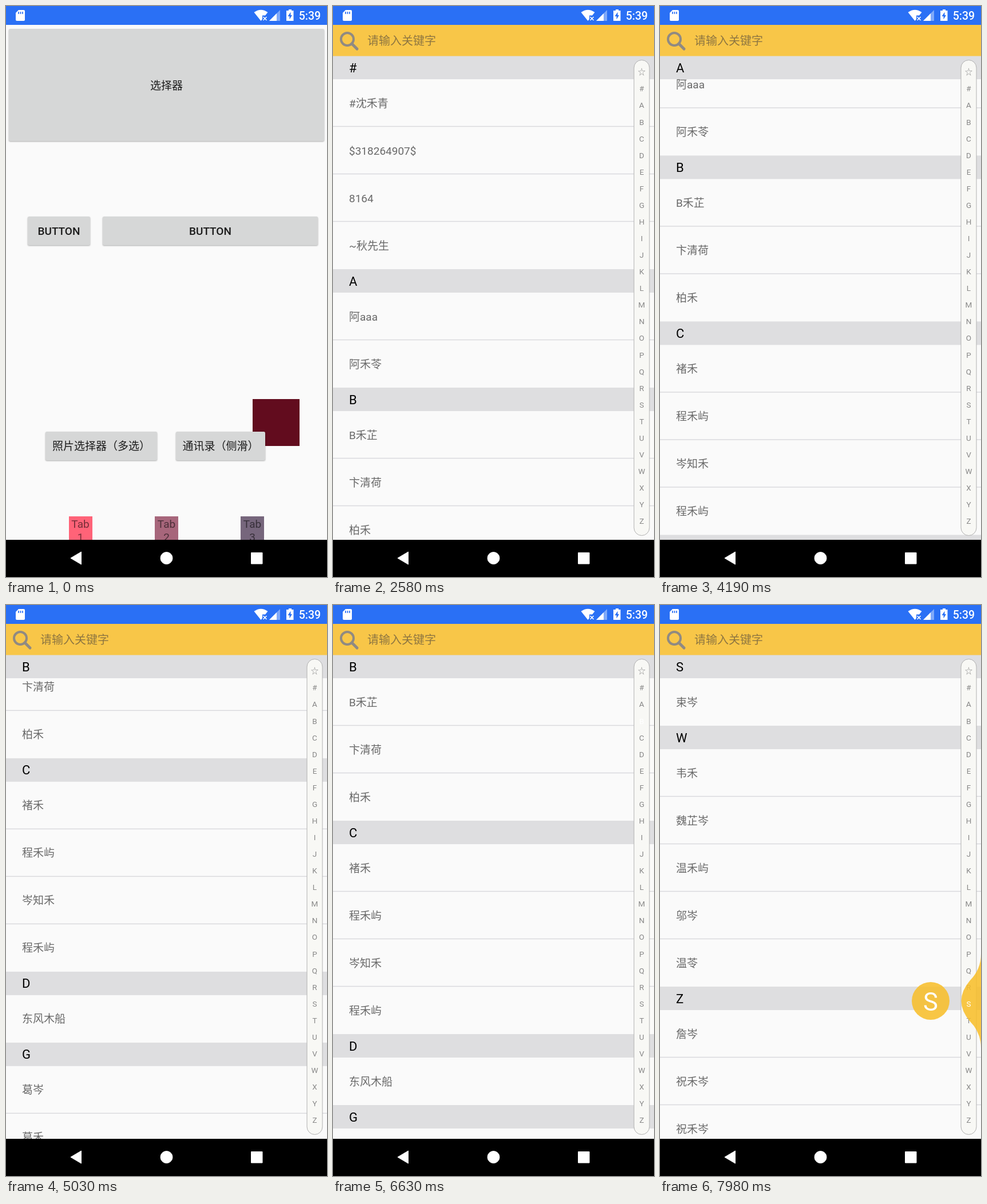
An HTML page for the animation above (8 s loop, 561 px wide and 998 px high).

```html
<!DOCTYPE html>
<html lang="zh-CN">
<head>
<meta charset="utf-8">
<title>Contacts</title>
<style>
  html, body { margin: 0; width: 100%; height: 100%; overflow: hidden; background: #fafafa; }
  svg { display: block; width: 100vw; height: 100vh; }
  text { font: 19px Roboto, "Noto Sans CJK SC", "Noto Sans CJK", sans-serif; }
  .mid { text-anchor: middle; }
  .btn rect { fill: #d6d7d7; filter: drop-shadow(0 1px 1px rgba(0,0,0,.32)); }
  .btn text { fill: #1b1b1b; font-weight: 500; text-anchor: middle; }
  .btn .zh { font-weight: 400; }
  .tab text { fill: rgba(0,0,0,.54); text-anchor: middle; }
  .name { fill: #696969; }
  .head rect { fill: #dedee0; }
  .head text { font-size: 22px; fill: #000; }
  .key { font-size: 13.5px; fill: #888; text-anchor: middle; }
  .accent { fill: rgba(249,190,40,.86); }
  #press { opacity: 0; animation: press 8s linear infinite; }
  @keyframes press {
    0%, 21.74% { opacity: 0; }
    21.75%, 24.5% { opacity: .1; }
    28%, 100% { opacity: 0; }
  }
</style>
</head>
<body>
<svg viewBox="0 0 561 998" preserveAspectRatio="none">
  <defs><clipPath id="view"><rect y="87" width="561" height="846"/></clipPath></defs>

  <g id="home">
    <rect width="561" height="998" fill="#fafafa"/>
    <rect x="431" y="687" width="82" height="82" fill="#620c1e"/>
    <g class="btn">
      <rect x="5" y="40" width="551" height="196" rx="2.5"/>
      <text class="zh" x="280.5" y="145.5">选择器</text>
      <rect x="38" y="368" width="109" height="50" rx="2.5"/>
      <text x="92.5" y="400">BUTTON</text>
      <rect x="169" y="368" width="376" height="50" rx="2.5"/>
      <text x="357" y="400">BUTTON</text>
      <rect x="69" y="744" width="195" height="50" rx="2.5"/>
      <text class="zh" x="166.5" y="775.5">照片选择器（多选）</text>
      <rect x="297" y="744" width="156" height="50" rx="2.5"/>
      <text class="zh" x="375" y="775.5">通讯录（侧滑）</text>
    </g>
    <rect id="press" x="297" y="744" width="156" height="50" rx="2.5"/>
    <g class="tab">
      <rect x="110" y="892" width="41" height="60" fill="#ff6378"/>
      <text x="130" y="912">Tab</text><text x="130" y="934.5">1</text>
      <rect x="260" y="892" width="41" height="60" fill="#a7667b"/>
      <text x="280.5" y="912">Tab</text><text x="280.5" y="934.5">2</text>
      <rect x="410" y="892" width="41" height="60" fill="#76667c"/>
      <text x="430.5" y="912">Tab</text><text x="430.5" y="934.5">3</text>
    </g>
  </g>

  <g id="contacts">
    <rect y="33" width="561" height="965" fill="#fafafa"/>
    <g clip-path="url(#view)">
      <g id="list"></g>
      <g id="sticky" class="head"><rect y="87" width="561" height="41"/><text x="28" y="115.5"></text></g>
    </g>
    <rect y="33" width="561" height="54.5" fill="#f8c648"/>
    <g fill="none" stroke="#908a82">
      <circle cx="25" cy="58" r="11" stroke-width="4"/>
      <path d="M33 66L42 75" stroke-width="5" stroke-linecap="round"/>
    </g>
    <text x="60" y="68" style="font-size:20px" fill="#8e7641">请输入关键字</text>
    <rect x="526" y="94.5" width="27" height="831" rx="13.5" fill="#f8f8f5" stroke="#b0b0b0"/>
    <g id="keys"></g>
    <g id="touch">
      <path id="wave" class="accent"/>
      <circle id="ball" class="accent" r="33"/>
      <text id="big" class="mid" style="font-size:43.5px" fill="#fff"></text>
      <text id="picked" class="key" style="fill:#fff"></text>
    </g>
  </g>

  <rect width="561" height="33" fill="#2a70f5"/>
  <g fill="#fff">
    <path d="M22 7H31Q33 7 33 9V24Q33 26 31 26H19Q17 26 17 24V12Z"/>
    <path d="M22 10v4M25.500 10v4M29 10v4" stroke="#2a70f5" stroke-width="1.700"/>
    <path d="M433.500 11Q445.500 2.500 457.500 11L453 16.500H448V23L445.500 26Z"/>
    <path d="M449.500 19l6 6m0-6l-6 6" stroke="#fff" stroke-width="1.700"/>
    <path d="M479 7V26H460Z" opacity=".4"/>
    <path d="M473 13V26H460Z"/>
    <path d="M494 6h5v2h3.500v18H490V8h4Z"/>
    <path d="M497.500 10.500L492.500 18H495.500V23.500L500 16H497.500Z" fill="#2a70f5"/>
    <text class="mid" x="531" y="24" style="font-size:19.500px;font-weight:500">5:39</text>
  </g>
  <rect y="933" width="561" height="65" fill="#000"/>
  <g fill="#fff" stroke="#fff" stroke-linejoin="round">
    <path d="M113 965L131.500 954V976Z"/>
    <circle cx="280.500" cy="965" r="10.500"/>
    <rect x="428.500" y="955.500" width="19.500" height="19.500"/>
  </g>
</svg>
<script>
const LOOP = 8000, TOP = 87, HEAD = 41, ROW = 83;
const PITCH = 29.07, KEY_TOP = 101.5, KEYS = '☆#ABCDEFGHIJKLMNOPQRSTUVWXYZ';
const groups = {
  '#': '#沈禾青 $318264907$ 8164 ~秋先生',
  A: '阿aaa 阿禾苓',
  B: 'B禾芷 卞清荷 柏禾',
  C: '褚禾 程禾屿 岑知禾 程禾屿',
  D: '东风木船',
  G: '葛岑 葛禾 顾芷禾 葛禾 顾芷禾',
  H: '贺禾 贺禾',
  J: '江岑 江禾苓',
  L: '路禾 路知岑 凌禾',
  M: '穆禾屿',
  P: '裴岑 裴禾',
  S: '束岑',
  W: '韦禾 魏芷岑 温禾屿 邬岑 温苓',
  Z: '詹岑 祝禾岑 祝禾岑 祝知禾'
};
const $ = id => document.getElementById(id);

function add(parent, tag, attrs, label) {
  const el = document.createElementNS('http://www.w3.org/2000/svg', tag);
  for (const k in attrs) el.setAttribute(k, attrs[k]);
  if (label) el.textContent = label;
  parent.appendChild(el);
  return el;
}

const sections = [];
let y = 0;
for (const [letter, names] of Object.entries(groups)) {
  sections.push({ letter, top: y, key: KEYS.indexOf(letter) });
  const head = add($('list'), 'g', { class: 'head' });
  add(head, 'rect', { y, width: 561, height: HEAD });
  add(head, 'text', { x: 28, y: y + 28.5 }, letter);
  y += HEAD;
  names.split(' ').forEach((name, i, all) => {
    add($('list'), 'text', { class: 'name', x: 28, y: y + 48.5 }, name);
    y += ROW;
    if (i < all.length - 1)
      add($('list'), 'rect', { y: y - 1.2, width: 561, height: 1.4, fill: '#d8d8dc' });
  });
}

const keyY = i => KEY_TOP + PITCH * (i + .5) + 4.3;
const keyEls = [...KEYS].map((k, i) => add($('keys'), 'text', { class: 'key', x: 539.5, y: keyY(i) }, k));

const clamp = u => Math.max(0, Math.min(1, u));
const easeOut = u => 1 - (1 - u) ** 2;
const easeInOut = u => (1 - Math.cos(Math.PI * u)) / 2;

// Stops are [time, value, easing into this stop].
function track(stops, t) {
  if (t <= stops[0][0]) return stops[0][1];
  for (let i = 1; i < stops.length; i++) {
    const [t0, v0] = stops[i - 1], [t1, v1, ease = u => u] = stops[i];
    if (t <= t1) return v0 + (v1 - v0) * ease((t - t0) / (t1 - t0));
  }
  return stops[stops.length - 1][1];
}

const flicks = [[3780, 0], [3820, 38], [4190, 405], [4350, 450, easeOut],
  [4830, 450], [4870, 490], [5250, 960], [5480, 1038, easeOut]];
const finger = [[6630, 200], [6760, 205], [7120, 328], [7160, 328], [7410, 434], [7490, 472],
  [7620, 472], [7980, 692]];
const TOUCH = 6630;

function drawTouch(cy, ratio, key) {
  const w = 561, r = 27.5, d = r * Math.SQRT1_2, x = w - d * ratio;
  $('wave').setAttribute('d', `M${w} ${cy - 3 * r}Q${w} ${cy - 2 * r} ${x} ${cy - 2 * r + d}` +
    `Q${w - 1.8 * r * ratio} ${cy} ${x} ${cy + 2 * r - d}Q${w} ${cy + 2 * r} ${w} ${cy + 3 * r}Z`);
  const bx = w + 33 - (2 * r + 66) * ratio;
  $('ball').setAttribute('cx', bx);
  $('ball').setAttribute('cy', cy);
  $('big').setAttribute('x', bx);
  $('big').setAttribute('y', cy + 16.5);
  $('big').textContent = ratio >= .9 ? KEYS[key] : '';
  $('picked').setAttribute('x', 539.5);
  $('picked').setAttribute('y', keyY(key));
  $('picked').textContent = KEYS[key];
}

function drawList(scroll) {
  $('list').setAttribute('transform', `translate(0 ${TOP - scroll})`);
  const i = sections.findLastIndex(s => s.top <= scroll);
  const next = sections[i + 1];
  const push = next ? Math.min(0, next.top - scroll - HEAD) : 0;
  $('sticky').setAttribute('transform', `translate(0 ${push})`);
  $('sticky').lastElementChild.textContent = sections[i].letter;
}

function render(t) {
  const enter = clamp((t - 2360) / 220);
  $('contacts').setAttribute('opacity', enter);
  $('contacts').setAttribute('transform', `translate(0 ${80 * (1 - easeOut(enter))})`);

  const touching = t >= TOUCH;
  let scroll = track(flicks, t), key = -1;
  if (touching) {
    const cy = track(finger, t);
    key = Math.floor((cy - KEY_TOP) / PITCH);
    scroll = sections.findLast(s => s.key <= key).top;
    drawTouch(cy, easeInOut(clamp((t - TOUCH) / 300)), key);
  }
  $('touch').setAttribute('visibility', touching ? 'visible' : 'hidden');
  keyEls.forEach((el, i) => el.setAttribute('opacity', i === key ? 0 : 1));
  drawList(scroll);
}

const press = $('press').getAnimations()[0];
const start = performance.now();
function tick() {
  const t = Math.max(0, performance.now() - start) % LOOP;
  if (press) press.currentTime = t;
  render(t);
  requestAnimationFrame(tick);
}
tick();
</script>
</body>
</html>
```
